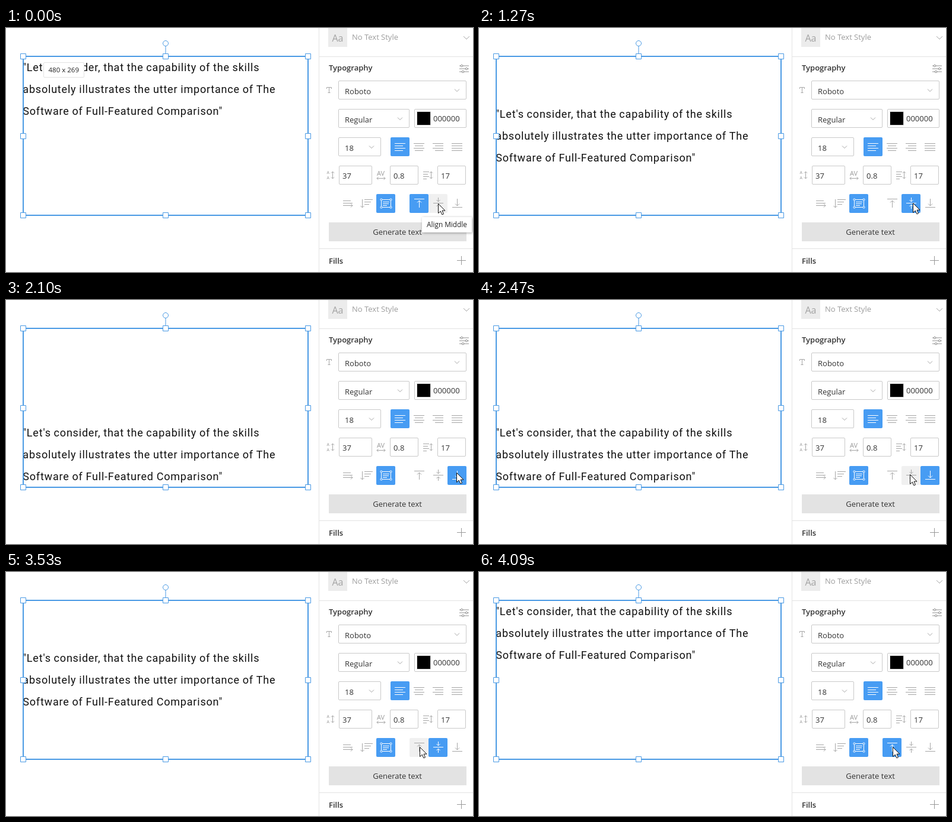
Animation of 787x413 px, one loop 4.39 s. Source, as an HTML page with a canvas:

```html
<!DOCTYPE html>
<html lang="en">
<head>
<meta charset="utf-8">
<title>Text alignment panel</title>
<style>
html, body { margin: 0; width: 100%; height: 100%; overflow: hidden; background: #fff; }
canvas { display: block; width: 787px; height: 413px; }
</style>
</head>
<body>
<canvas id="stage"></canvas>
<script>
const W = 787, H = 413, LOOP = 4390;
const BLUE = '#479cf3', LINE = '#4a9ae4', ICON = '#a6a6a6', EDGE = '#c9c9c9', INK = '#333';
const UI = '"Open Sans", "Noto Sans", sans-serif';
const TOP = 0, MIDDLE = 1, BOTTOM = 2;
const HINTS = ['Align Top', 'Align Middle'];
const QUOTE = [
  '"Let\'s consider, that the capability of the skills',
  'absolutely illustrates the utter importance of The',
  'Software of Full-Featured Comparison"'
];

// The pointer leaves at `go`, presses at `at`; the button and then the text follow
const CLICKS = [
  { kind: MIDDLE, go: 0, hint: 0, at: 710, x: 728, y: 297 },
  { kind: BOTTOM, go: 1270, at: 1780, x: 759, y: 292 },
  { kind: MIDDLE, go: 2170, hint: 2720, at: 2780, x: 726, y: 295 },
  { kind: TOP, go: 3150, hint: 3650, at: 3770, x: 697, y: 296 }
];
const ACTIVATE = 125, SETTLE = 200, GLOW = 130, HINT_OUT = 60;
const STEP = 65, STEPS = 5;

const canvas = document.getElementById('stage');
const ctx = canvas.getContext('2d');
const dpr = window.devicePixelRatio || 1;
canvas.width = W * dpr;
canvas.height = H * dpr;

const kindAfter = (t, delay) =>
  CLICKS.reduce((kind, c) => t >= c.at + delay ? c.kind : kind, TOP);

function pointerAt(t) {
  let { x, y } = CLICKS[0];
  for (const c of CLICKS) {
    if (t < c.go) break;
    const p = Math.min(1, (Math.floor((t - c.go) / STEP) + 1) / STEPS);
    const e = p * p * (3 - 2 * p);
    x += (c.x - x) * e;
    y += (c.y - y) * e;
  }
  return { x: Math.round(x), y: Math.round(y) };
}

function box(x, y, w, h, color, r = 0) {
  ctx.fillStyle = color;
  ctx.beginPath();
  ctx.roundRect(x, y, w, h, r);
  ctx.fill();
}

function frame(x, y, w, h, color = EDGE, r = 1.5) {
  ctx.strokeStyle = color;
  ctx.lineWidth = 1;
  ctx.beginPath();
  ctx.roundRect(x + .5, y + .5, w - 1, h - 1, r);
  ctx.stroke();
}

function path(color, ...pts) {
  ctx.strokeStyle = color;
  ctx.lineWidth = 1;
  ctx.beginPath();
  for (let i = 0; i < pts.length; i += 2) ctx.lineTo(pts[i], pts[i + 1]);
  ctx.stroke();
}

function dot(x, y, r, fill, stroke) {
  ctx.beginPath();
  ctx.arc(x, y, r, 0, Math.PI * 2);
  ctx.fillStyle = fill;
  ctx.fill();
  if (!stroke) return;
  ctx.strokeStyle = stroke;
  ctx.lineWidth = 1;
  ctx.stroke();
}

function label(str, x, y, size = 13, color = INK, weight = 400, align = 'left') {
  ctx.font = `${weight} ${size}px ${UI}`;
  ctx.fillStyle = color;
  ctx.textAlign = align;
  ctx.fillText(str, x, y);
}

// Straight arrow along one axis, with an open head
function arrow(color, x0, y0, x1, y1, head = 3) {
  const dx = Math.sign(x1 - x0) * head, dy = Math.sign(y1 - y0) * head;
  path(color, x0, y0, x1, y1);
  path(color, x1 - dx - dy, y1 - dy - dx, x1, y1, x1 - dx + dy, y1 - dy + dx);
}

function doubleArrow(color, x0, y0, x1, y1) {
  arrow(color, x0, y0, x1, y1, 2.5);
  arrow(color, x1, y1, x0, y0, 2.5);
}

function bars(color, x, y, gap, ...widths) {
  widths.forEach((w, i) => path(color, x, y + i * gap, x + w, y + i * gap));
}

const chevron = (x, y, r = 4) => path(ICON, x - r, y - r / 2, x, y + r / 2, x + r, y - r / 2);

function field(str, x, y, w, pad, base, open) {
  frame(x, y, w, 32);
  label(str, x + pad, y + base);
  if (open) chevron(x + w - 16, y + 16.5);
}

function drawQuote(place) {
  ctx.font = '400 18px Roboto, sans-serif';
  ctx.letterSpacing = '0.8px';
  ctx.wordSpacing = '-0.4px';
  ctx.fillStyle = '#111';
  ctx.textAlign = 'left';
  QUOTE.forEach((s, i) => ctx.fillText(s, 28.3, 73 + i * 37 + place * 79));
  ctx.letterSpacing = ctx.wordSpacing = '0px';
}

function drawSelection() {
  const x = 29, y = 48, w = 480, h = 269;
  ctx.strokeStyle = LINE;
  ctx.lineWidth = 2;
  ctx.strokeRect(x, y, w, h);
  path(LINE, x + w / 2, 31, x + w / 2, 43);
  dot(x + w / 2, 26, 4.5, '#fff', LINE);
  for (let i = 0; i < 9; i++) {
    if (i === 4) continue;
    const hx = x - 5 + w / 2 * (i % 3), hy = y - 5 + Math.ceil(h / 2 * Math.floor(i / 3));
    box(hx, hy, 10, 10, '#fff');
    frame(hx, hy, 10, 10, LINE, 0);
  }
}

function drawSize() {
  box(63, 58, 69, 26, '#fff', 1);
  frame(63, 58, 69, 26, '#e2e2e2');
  label('480 x 269', 71.5, 75, 11.5, '#222');
}

// Left, centre, right and justified, 32 px apart
function drawParagraphIcons() {
  box(648, 185, 32, 32, BLUE, 2);
  for (let side = 0; side < 4; side++) {
    const color = side ? ICON : '#fff', x = 655 + side * 32;
    for (let i = 0; i < 4; i++) {
      const w = i % 2 && side < 3 ? 14 : 18;
      bars(color, x + (18 - w) * side / 2, 195.5 + i * 4, 0, w);
    }
  }
}

function drawSpacingIcons() {
  label('A', 540.5, 247, 7, '#999');
  label('A', 540.5, 256, 7, '#999');
  doubleArrow(ICON, 550.5, 243, 550.5, 255);
  label('AV', 625, 250, 11, '#999');
  doubleArrow(ICON, 625, 254.5, 639, 254.5);
  bars(ICON, 703, 243.5, 4, 10, 8, 10, 6);
  doubleArrow(ICON, 716.5, 243, 716.5, 255);
}

function drawModeIcons() {
  bars(ICON, 568, 292.5, 4, 13, 16);
  arrow(ICON, 568, 300.5, 584, 300.5);
  arrow(ICON, 600.5, 290, 600.5, 304);
  bars(ICON, 604, 290.5, 4, 14, 11, 8);

  box(624, 281, 32, 32, BLUE, 2);
  frame(632, 290, 17, 14, '#fff', 0);
  for (let i = 0; i < 4; i++) dot(632.5 + i % 2 * 16, 290.5 + (i >> 1) * 13, 1.6, BLUE, '#fff');
  bars('#fff', 635, 294.5, 3, 11, 10, 7);
}

function drawAlignButton(kind, active, mouse) {
  const x = 680 + kind * 32, mid = x + 16.5;
  const color = kind === active ? '#fff' : ICON;
  const over = mouse.x >= x && mouse.x < x + 32;
  if (kind === active || over) box(x, 281, 32, 32, kind === active ? BLUE : '#f0f0f0', 2);
  bars(color, x + 8, 289.5 + kind * 7, 0, 17);
  if (kind === TOP) arrow(color, mid, 304, mid, 292, 3.5);
  if (kind === BOTTOM) arrow(color, mid, 289, mid, 301, 3.5);
  if (kind === MIDDLE) {
    arrow(color, mid, 287, mid, 294);
    arrow(color, mid, 306, mid, 299);
  }
}

function drawPanel(active, mouse) {
  const rule = '#e3e3e3';
  path(rule, 527.5, 0, 527.5, H);
  for (const y of [48.5, 373.5]) path(rule, 528, y, W, y);

  box(543, 0, 32, 32, '#ececec');
  label('Aa', 559, 23, 16, '#a3a3a3', 400, 'center');
  label('No Text Style', 583, 20, 13, '#9c9c9c');
  chevron(776, 16.5, 5);

  label('Typography', 544, 72, 13, INK, 600);
  for (let i = 0; i < 3; i++) {
    const y = 64 + i * 5;
    bars('#8e8e8e', 764, y, 0, 16);
    dot(768 + i * 8 % 14, y, 1.7, '#fff', '#8e8e8e');
  }

  path(ICON, 540.5, 103, 540.5, 100.5, 548.5, 100.5, 548.5, 103);
  path(ICON, 544.5, 100.5, 544.5, 109.5);
  bars(ICON, 542.5, 109.5, 0, 4);
  field('Roboto', 560, 89, 216, 11, 23, true);
  field('Regular', 560, 137, 120, 11, 23, true);
  field('000000', 688, 137, 88, 32, 21);
  box(693, 142, 22, 22, '#000');
  frame(692, 141, 24, 24, '#ddd', 0);
  field('18', 560, 185, 72, 11, 23, true);
  drawParagraphIcons();

  drawSpacingIcons();
  field('37', 561, 233, 56, 6, 22);
  field('0.8', 647, 233, 48, 6, 22);
  field('17', 727, 233, 48, 6, 22);

  drawModeIcons();
  for (const kind of [TOP, MIDDLE, BOTTOM]) drawAlignButton(kind, active, mouse);

  box(544, 329, 232, 32, rule);
  label('Generate text', 659.5, 350, 13, INK, 400, 'center');
  label('Fills', 544, 399, 13, INK, 600);
  path('#999', 760, 393.5, 775, 393.5);
  path('#999', 767.5, 386, 767.5, 401);
}

function drawHint(str, mouse, alpha) {
  ctx.save();
  ctx.globalAlpha = alpha;
  ctx.font = `400 11.8px ${UI}`;
  const w = Math.round(ctx.measureText(str).width) + 16;
  const x = Math.min(mouse.x + 5, 785 - w);
  ctx.shadowColor = 'rgba(0,0,0,.35)';
  ctx.shadowBlur = 4 * dpr;
  ctx.shadowOffsetX = ctx.shadowOffsetY = dpr;
  box(x, 320, w, 26, '#fff', 1);
  ctx.shadowColor = 'transparent';
  label(str, x + 8, 337, 11.8, '#222');
  ctx.restore();
}

function drawPointer({ x, y }) {
  ctx.save();
  ctx.translate(x + .5, y + .5);
  ctx.beginPath();
  ctx.moveTo(0, 0);
  ctx.lineTo(0, 16);
  ctx.lineTo(3.8, 12.6);
  ctx.lineTo(6.4, 18.4);
  ctx.lineTo(9, 17.3);
  ctx.lineTo(6.5, 11.6);
  ctx.lineTo(11.5, 11.6);
  ctx.closePath();
  ctx.fillStyle = '#fff';
  ctx.fill();
  ctx.strokeStyle = '#111';
  ctx.lineWidth = 1;
  ctx.stroke();
  ctx.restore();
}

function draw(t) {
  const mouse = pointerAt(t);
  ctx.setTransform(dpr, 0, 0, dpr, 0, 0);
  box(0, 0, W, H, '#fff');
  drawQuote(kindAfter(t, SETTLE));
  drawSelection();
  if (t < CLICKS[0].at + SETTLE) drawSize();
  drawPanel(kindAfter(t, ACTIVATE), mouse);
  for (const c of CLICKS) {
    if (t >= c.hint && t < c.at + HINT_OUT) {
      drawHint(HINTS[c.kind], mouse, c.hint && t < c.hint + STEP ? .5 : 1);
    }
    if (t >= c.at && t < c.at + GLOW) dot(mouse.x, mouse.y, 12, 'rgba(240,226,20,.7)');
  }
  drawPointer(mouse);
}

const begin = performance.now();
function tick() {
  draw((performance.now() - begin) % LOOP);
  requestAnimationFrame(tick);
}
tick();
</script>
</body>
</html>
```
